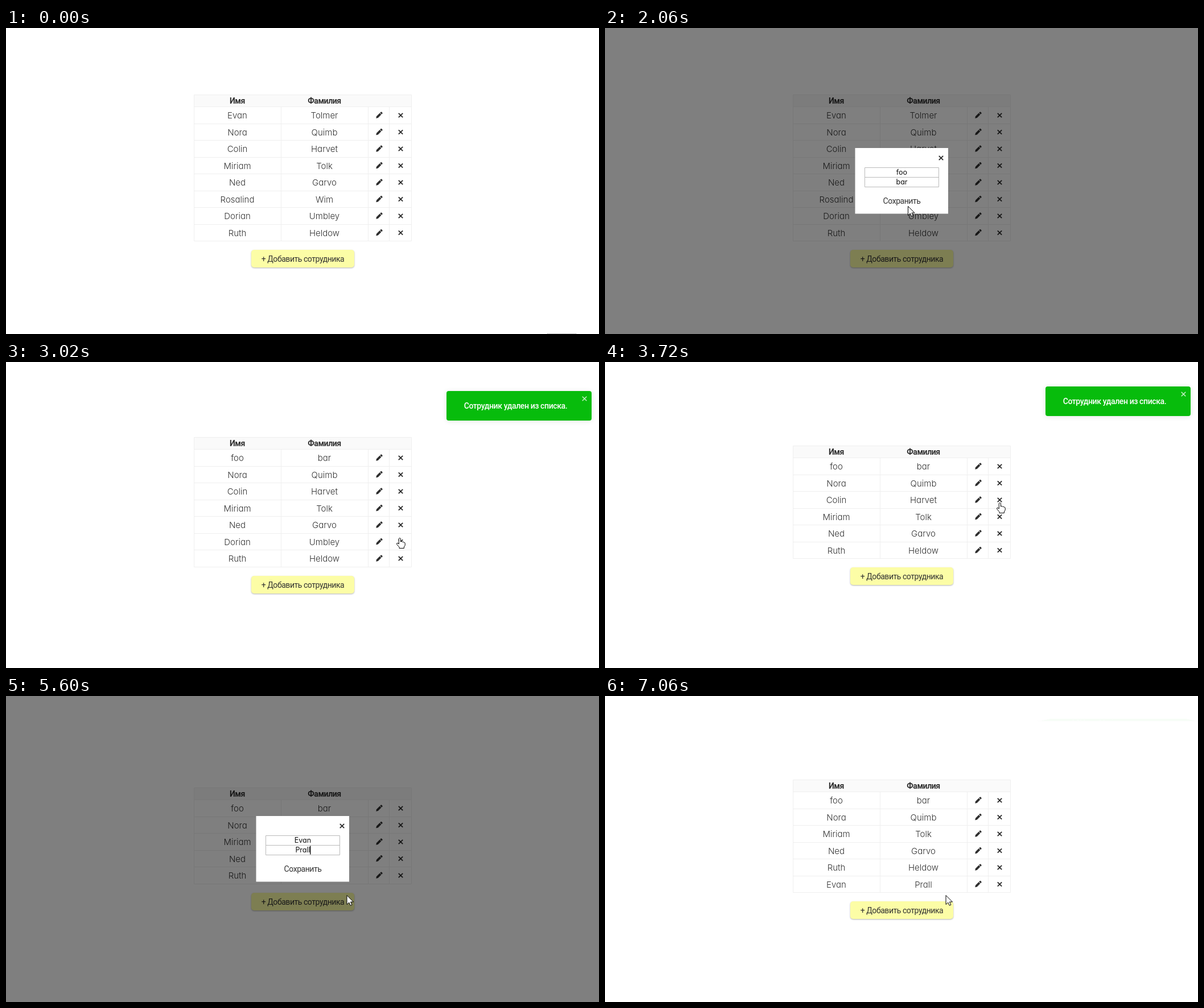
An HTML page for the animation above (7140 ms loop, 1042 px wide and 538 px high).

```html
<!DOCTYPE html>
<html lang="ru">
<head>
<meta charset="utf-8">
<title>Список сотрудников</title>
<style>
  html, body { margin: 0; width: 100%; height: 100%; overflow: hidden; background: #fff; }
  svg { display: block; position: absolute; left: 0; top: 0; }
  text { text-anchor: middle; fill: #333; }
  .cell { font: 350 15px Inter, sans-serif; font-feature-settings: "cv11"; }
  .field { font: 12.5px Inter, sans-serif; font-feature-settings: "cv11"; fill: #111; }
  .label { font: 14px Roboto, sans-serif; letter-spacing: -.45px; }
  .head { font-weight: 700; letter-spacing: -.4px; }
  .hint { font: 12px Roboto, sans-serif; letter-spacing: -.3px; }
  .empty { fill: #c8c8c8; }
  .button { fill: #fcfda6; filter: drop-shadow(0 1px 1px rgba(0,0,0,.3)); }
  .toast {
    position: absolute; left: 774px; top: 0; width: 255px; height: 52px;
    border-radius: 4px; background: #07bc0c; box-shadow: 0 1px 10px rgba(0,0,0,.1);
    color: #fff; font: 500 14px/52px Roboto, sans-serif; letter-spacing: -.4px;
    text-align: center; text-indent: -12px; white-space: nowrap;
  }
  .toast svg { left: 238px; top: 9px; opacity: .75; }
</style>
</head>
<body>
<svg id="stage" width="1042" height="538" viewBox="0 0 1042 538">
  <defs>
    <path id="cross" d="M-3.7-3.7 3.7 3.7M-3.7 3.7 3.7-3.7" stroke="#2b2b2b" stroke-width="1.8"/>
    <g id="pencil" transform="rotate(-45)" fill="#2e2e2e">
      <path d="M-7.5 0-4.4-1.9H3.6V1.9H-4.4Z"/>
      <path d="M4.4-1.9H6.3Q7.4-1.9 7.4-.9V.9Q7.4 1.9 6.3 1.9H4.4Z"/>
    </g>
  </defs>
  <path id="edge" d="M951 537.5H1002" stroke="#888" stroke-dasharray="1 1"/>
  <g id="table"></g>
  <g id="addButton">
    <rect class="button" x="431" width="181" height="31" rx="5"/>
    <text class="label" x="521.5" y="20.5">+ Добавить сотрудника</text>
  </g>
  <g id="modal">
    <rect width="1042" height="538" opacity=".5"/>
    <rect x="439.5" y="211" width="163.5" height="115.5" fill="#fff"/>
    <use href="#cross" x="590.5" y="228.5"/>
    <path d="M456.5 245.5H586.5V279.5H456.5ZM456.5 262.5H586.5" fill="none" stroke="#bbb"/>
    <text id="first" x="521.5" y="258"></text>
    <text id="last" x="521.5" y="275"></text>
    <rect id="caret" width="1.3" height="15"/>
    <rect id="focusRing" x="463" y="283" width="116" height="40" rx="3" fill="none" stroke="#101010" stroke-width="2"/>
    <text class="label" x="521.5" y="308.5">Сохранить</text>
  </g>
  <g id="cursor" stroke="#000" fill="#fff" stroke-linejoin="round">
    <path id="arrow" d="M.5.5V16.5L4.3 13 6.7 18.3 9.3 17.2 7 12H12Z"/>
    <path id="hand" d="M.3 1.5Q2-.8 3.5 1.5V7Q5.4 5.5 6.5 7.4 8 6.3 9.2 8.2 11 7.6 11.2 9.8V13.5L9.4 16V18.5H1V16.5L-3.3 11.5Q-4 9.3-2 9.2L.3 11Z"/>
  </g>
</svg>
<script>
const LOOP = 7140;
const EDIT_SAVE = 2120, ADD_SAVE = 6120;
const $ = id => document.getElementById(id);
const show = (el, on) => { el.style.display = on ? '' : 'none'; };
const clamp = v => Math.max(0, Math.min(1, v));
const within = (t, [from, to]) => t >= from && t < to;
const crisp = v => Math.floor(v) + .5;

const people = [
  ['Evan', 'Tolmer'], ['Nora', 'Quimb'], ['Colin', 'Harvet'], ['Miriam', 'Tolk'],
  ['Ned', 'Garvo'], ['Rosalind', 'Wim'], ['Dorian', 'Umbley'], ['Ruth', 'Heldow']
];
const edited = ['foo', 'bar'], added = ['Evan', 'Prall'];
const removals = [[2800, 5], [3492, 6], [3744, 2]];

const deletedText = 'Сотрудник удален из списка.';
const toasts = [
  { text: 'Данные сотрудника изменены.', from: EDIT_SAVE, to: 2800 },
  { text: deletedText, from: 2800, to: 3492, stacked: true },
  { text: deletedText, from: 3492, to: 3744, stacked: true },
  { text: deletedText, from: 3744, to: 4600, stacked: true },
  { text: 'Сотрудник добавлен в список.', from: ADD_SAVE, to: 6915 }
];
const FLIP = 150;

// Time, x, y of the pointer tip
const pointer = [
  [100, 975, 537], [300, 654, 153], [1640, 654, 153], [1880, 528, 336], [2040, 528, 336],
  [2060, 532, 313], [2100, 535, 305], [2240, 535, 305], [2560, 690, 309], [3560, 690, 309],
  [3700, 692, 247], [4020, 692, 247], [4220, 598.5, 350]
];
const handTimes = [[270, 340], [2100, 2160], [2520, 4050], [4190, 4270]];

// Moments at which each letter appears; tab moves to the second field
const typing = {
  edit: { words: edited, hints: people[0], first: [820, 880, 960], tab: 1040, last: [1100, 1180, 1260], blur: 1880 },
  add: { words: added, hints: ['Имя', 'Фамилия'], first: [5040, 5100, 5160, 5200], tab: 5260, last: [5420, 5480, 5540, 5540, 5600], blur: 5860 }
};

// Interpolates keys of the form [position, value, value...]
function track(keys, p, ease = v => v) {
  if (p <= keys[0][0]) return keys[0].slice(1);
  const i = keys.findIndex(k => k[0] > p);
  if (i < 0) return keys[keys.length - 1].slice(1);
  const a = keys[i - 1], b = keys[i], f = ease((p - a[0]) / (b[0] - a[0]));
  return a.slice(1).map((v, n) => v + (b[n + 1] - v) * f);
}

const smooth = v => v * v * (3 - 2 * v);

function rowsAt(t) {
  const rows = people
    .map((person, i) => i === 0 && t >= EDIT_SAVE ? edited : person)
    .filter((_, i) => !removals.some(([time, row]) => row === i && t >= time));
  return t >= ADD_SAVE ? [...rows, added] : rows;
}

let tableKey = '';
function drawTable(t) {
  const rows = rowsAt(t), key = rows.join();
  if (key === tableKey) return;
  tableKey = key;
  const rowHeight = 29.5;
  const top = Math.round(117 + (8 - rows.length) * rowHeight / 2) + .5;
  const body = top + 21, bottom = body + rows.length * rowHeight;
  const lines = rows.map((_, i) => `M330 ${crisp(body + i * rowHeight)}H713`).join('');
  const columns = [483.5, 636.5, 673.5].map(x => `M${x} ${body}V${bottom}`).join('');
  const cells = rows.map(([first, last], i) => {
    const y = body + i * rowHeight + 15;
    return `<text class="cell" x="406.5" y="${y + 5.5}">${first}</text>
      <text class="cell" x="559.5" y="${y + 5.5}">${last}</text>
      <g transform="translate(655.5 ${y})"><use href="#pencil"/></g>
      <use href="#cross" x="693.5" y="${y}"/>`;
  }).join('');
  $('table').innerHTML = `<rect x="330" y="${top}" width="382" height="21" fill="#fafafa"/>
    <path d="M330.5 ${top}H712.5V${crisp(bottom)}H330.5Z${lines}${columns}" fill="none" stroke="#efefef"/>
    <text class="label head" x="406.5" y="${top + 15.5}">Имя</text>
    <text class="label head" x="559.5" y="${top + 15.5}">Фамилия</text>${cells}`;
  $('addButton').setAttribute('transform', `translate(0 ${Math.ceil(bottom + 15.5)})`);
}

function fillField(el, word, hint, hintClass, count) {
  el.textContent = count ? word.slice(0, count) : hint;
  el.setAttribute('class', count ? 'field' : hintClass + ' empty');
}

function drawModal(t) {
  const adding = t > 3000;
  const form = adding ? typing.add : typing.edit;
  const opacity = adding
    ? clamp((t - 4250) / 180) * clamp((6290 - t) / 170)
    : clamp((t - 310) / 180) * clamp((2300 - t) / 170);
  show($('modal'), opacity > 0);
  if (!opacity) return;
  $('modal').setAttribute('opacity', opacity);
  const counts = [form.first, form.last].map(times => times.filter(time => t >= time).length);
  const fields = [$('first'), $('last')];
  fields.forEach((el, i) =>
    fillField(el, form.words[i], form.hints[i], adding ? 'hint' : 'field', counts[i]));

  const active = t >= form.tab ? 1 : 0;
  const width = counts[active] ? fields[active].getComputedTextLength() : 0;
  $('caret').setAttribute('x', 521 + width / 2);
  $('caret').setAttribute('y', active ? 263.5 : 246.5);
  show($('caret'), t < form.blur);
  show($('focusRing'), adding && t >= form.blur);
}

function drawToast({ el, from, to, stacked }, t) {
  const visible = within(t, [from, to + FLIP]);
  show(el, visible);
  if (!visible) return;
  const [angle, opacity] = t < to
    ? track([[0, 90, 0], [.4, -20, .67], [.6, 10, 1], [.8, -5, 1], [1, 0, 1]], (t - from) / FLIP)
    : track([[0, 0, 1], [.3, -20, 1], [1, 90, 0]], (t - to) / FLIP);
  const y = stacked ? 84 - 68 * clamp((t - from - 188) / 68) : 16;
  el.style.opacity = opacity;
  el.style.transform = `translateY(${y}px) perspective(400px) rotateX(${angle}deg)`;
}

function drawCursor(t) {
  const [x, y] = track(pointer, t, smooth);
  const hand = handTimes.some(span => within(t, span));
  show($('cursor'), t >= 100);
  show($('hand'), hand);
  show($('arrow'), !hand);
  $('cursor').setAttribute('transform', `translate(${x} ${y})`);
}

function draw(t) {
  show($('edge'), t < 100);
  drawTable(t);
  drawModal(t);
  toasts.forEach(toast => drawToast(toast, t));
  drawCursor(t);
}

for (const toast of toasts) {
  toast.el = document.createElement('div');
  toast.el.className = 'toast';
  toast.el.innerHTML = `${toast.text}<svg width="9" height="9"><path d="M.7.7 8.3 8.3M.7 8.3 8.3.7" stroke="#fff" stroke-width="1.6"/></svg>`;
  document.body.append(toast.el);
}

const start = performance.now();
function tick() {
  draw((performance.now() - start) % LOOP);
  requestAnimationFrame(tick);
}
tick();
</script>
</body>
</html>
```
